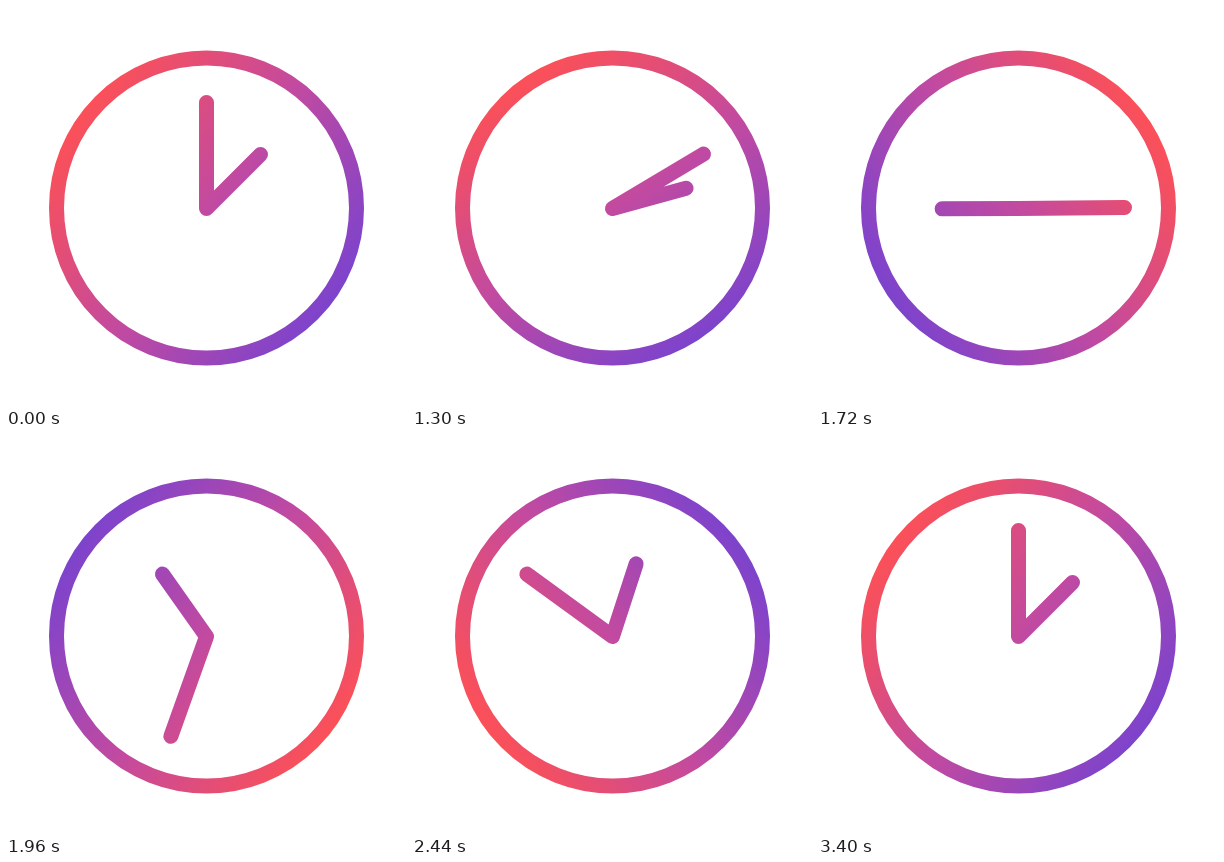
Write an HTML page with a canvas that moves like this. It is 400 px wide and 400 px high and loops after 3490 ms.

```html
<!DOCTYPE html>
<html lang="en">
<head>
<meta charset="utf-8">
<title>Clock</title>
<style>
  html, body { margin: 0; width: 100%; height: 100%; overflow: hidden; background: #fff; }
  canvas { display: block; width: 400px; height: 400px; }
</style>
</head>
<body>
<canvas id="stage" width="400" height="400"></canvas>
<script>
const ctx = document.getElementById('stage').getContext('2d');

const LOOP = 3490, DELAY = 1000, DURATION = 2400, STEP = 30;
const TURN = Math.PI * 2;
const CENTER = { x: 200.5, y: 202.5 };
const RING = { y: 202, radius: 150 };
const MINUTE_LENGTH = 106, HOUR_LENGTH = 54 * Math.SQRT2;
const GRADIENT_ANGLE = -54 / 360 * TURN, GRADIENT_RADIUS = 157;

// Bezier easing with control points (x1, 0) and (x2, 1)
function bezierEase(x1, x2) {
  return x => {
    if (x <= 0) return 0;
    if (x >= 1) return 1;
    let low = 0, high = 1;
    for (let i = 0; i < 30; i++) {
      const s = (low + high) / 2, r = 1 - s;
      if (3 * r * r * s * x1 + 3 * r * s * s * x2 + s ** 3 < x) low = s;
      else high = s;
    }
    return low * low * (3 - 2 * low);
  };
}

const easeHands = bezierEase(1 / 3, 0);
const easeColor = bezierEase(1 / 3, 0.4);

// Angles run clockwise from twelve o'clock
function polar(angle, length) {
  return [CENTER.x + Math.sin(angle) * length, CENTER.y - Math.cos(angle) * length];
}

function makeGradient(angle) {
  const gradient = ctx.createLinearGradient(
    ...polar(angle, GRADIENT_RADIUS), ...polar(angle, -GRADIENT_RADIUS));
  gradient.addColorStop(0, '#fb5058');
  gradient.addColorStop(0.5, '#c24aa0');
  gradient.addColorStop(1, '#7d43cc');
  return gradient;
}

function draw(time) {
  const elapsed = Math.floor((time % LOOP - DELAY) / STEP + 1e-6) * STEP;
  const progress = elapsed / DURATION;
  const turn = easeHands(progress) * TURN;

  ctx.fillStyle = '#fff';
  ctx.fillRect(0, 0, 400, 400);
  ctx.strokeStyle = makeGradient(GRADIENT_ANGLE + easeColor(progress) * TURN);
  ctx.lineWidth = 15;
  ctx.lineCap = ctx.lineJoin = 'round';

  ctx.beginPath();
  ctx.arc(CENTER.x, RING.y, RING.radius, 0, TURN);
  ctx.stroke();

  ctx.beginPath();
  ctx.moveTo(...polar(turn * 2, MINUTE_LENGTH));
  ctx.lineTo(CENTER.x, CENTER.y);
  ctx.lineTo(...polar(turn + TURN / 8, HOUR_LENGTH));
  ctx.stroke();
}

let start;
function tick(now) {
  start ??= now;
  draw(Math.max(0, now - start));
  requestAnimationFrame(tick);
}

draw(0);
requestAnimationFrame(tick);
</script>
</body>
</html>
```
